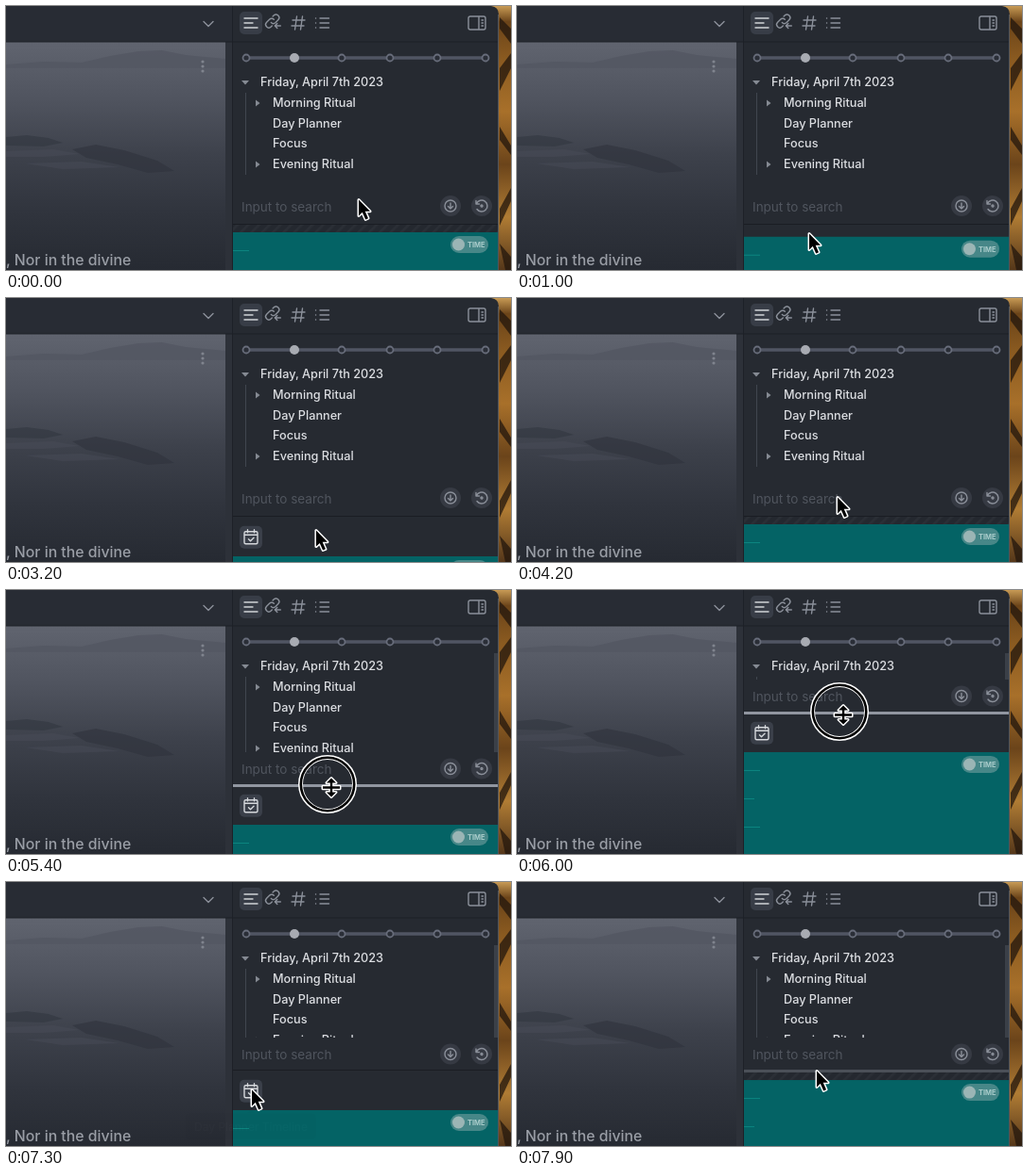
Animation, 534 px wide and 280 px high, one loop 8 s. Source, as an HTML page:

```html
<!DOCTYPE html>
<html lang="en">
<head>
<meta charset="utf-8">
<title>Collapsing sidebar header</title>
<style>
  html, body { margin: 0; width: 100%; height: 100%; overflow: hidden; background: #262a31; }
  svg { display: block; width: 534px; height: 280px; font-family: Inter, sans-serif; }
  .icon { fill: none; stroke: #8b909a; stroke-width: 1.4; stroke-linecap: round; stroke-linejoin: round; }
  .tree { font-size: 12.7px; font-weight: 500; fill: #dcdee2; }
  .cursor { stroke: #fff; stroke-width: 3; stroke-linejoin: round; paint-order: stroke; }
</style>
</head>
<body>
<svg viewBox="0 0 534 280">
  <defs>
    <linearGradient id="sea" x2="0" y2="1">
      <stop offset="0" stop-color="#60646f"/>
      <stop offset=".25" stop-color="#50545f"/>
      <stop offset=".5" stop-color="#3d414b"/>
      <stop offset=".75" stop-color="#30343d"/>
      <stop offset="1" stop-color="#262a32"/>
    </linearGradient>
    <linearGradient id="wall" x2="0" y2="1">
      <stop offset="0" stop-color="#c79a55"/>
      <stop offset=".06" stop-color="#6b4419"/>
      <stop offset=".2" stop-color="#8a5a20"/>
      <stop offset=".4" stop-color="#a8702a"/>
      <stop offset=".6" stop-color="#6b441a"/>
      <stop offset=".8" stop-color="#b07c34"/>
      <stop offset="1" stop-color="#55371a"/>
    </linearGradient>
    <pattern id="hatch" width="8" height="8" patternUnits="userSpaceOnUse" patternTransform="rotate(45)">
      <rect width="8" height="8" fill="#24282f"/><rect width="2.5" height="8" fill="#2b2f36"/>
    </pattern>
    <clipPath id="treeClip"><rect id="treeBox" x="240" y="66" width="281"/></clipPath>
    <clipPath id="headClip"><rect id="headBox" x="240" width="281"/></clipPath>
  </defs>

  <!-- desktop and window -->
  <rect x="510" width="24" height="280" fill="url(#wall)"/>
  <path d="M522 12l12 12v16l-12-16zM522 66l12-16v16l-12 24zM522 128l12 20v10l-12-16zM522 215l12-22v14l-12 26zM522 252l12 14v14h-6z" fill="#22160d" opacity=".75"/>
  <path d="M0 0H513Q521 1 521 9V280H0Z" fill="#262a31"/>
  <rect width="239" height="38" fill="#282c34"/>

  <!-- note -->
  <rect y="38" width="232" height="242" fill="url(#sea)"/>
  <path d="M0 62L40 59 80 60 110 53 140 48 165 47 190 52 232 56V66H0Z" fill="#535762" opacity=".8"/>
  <path d="M0 139L22 137 45 140 60 145 40 149 0 148Z" fill="#31353e" opacity=".55"/>
  <path d="M70 152L95 147 125 153 160 164 178 175 150 177 118 168 85 161Z" fill="#2f333c" opacity=".6"/>
  <path d="M0 154L50 152 78 157 40 160 0 160ZM20 167L80 165 120 171 60 173Z" fill="#4b4f5a" opacity=".4"/>
  <rect x="232" y="38" width="7" height="242" fill="#2d3139"/>
  <g fill="#80848e"><circle cx="208" cy="59" r="1.600"/><circle cx="208" cy="64" r="1.600"/><circle cx="208" cy="69" r="1.600"/></g>
  <text x="0" y="275" font-size="15.800" font-weight="500" fill="#9a9ea6">, Nor in the divine</text>
  <path class="icon" d="M209 16.500l5 5 5-5"/>
  <path d="M0 38H521M239.500 0V280" stroke="#1d2027"/>

  <!-- toolbar -->
  <rect x="247" y="6" width="24" height="24" rx="5" fill="#383d47"/>
  <path class="icon" style="stroke:#d0d3d8" d="M252 13h14M252 18h9M252 23h14"/>
  <g class="icon">
    <path transform="translate(-.7 0)" d="M282 21l-1 1a3.300 3.300 0 0 1-4.700-4.700l3-3a3.300 3.300 0 0 1 4.700 0M281 17.500a3.300 3.300 0 0 0 4.500.3l3-3a3.300 3.300 0 0 0-4.700-4.700l-1 1M291 21h-6m2.500-2.500L285 21l2.500 2.500"/>
    <path d="M303 15h13M302 21h13M307.500 11l-2 14M313.500 11l-2 14"/>
    <path d="M327.500 13h.1M327.500 18h.1M327.500 23h.1M332 13h9.500M332 18h9.500M332 23h9.500"/>
    <path d="M491 11h14q2 0 2 2v10q0 2-2 2h-14q-2 0-2-2v-10q0-2 2-2zM500 11v14M503 15h1.500M503 18h1.500M503 21h1.500"/>
  </g>
  <path d="M254 55H507" stroke="#505563" stroke-width="3.500"/>
  <g id="stops" fill="#2a2e37" stroke="#686d7b" stroke-width="1.800"></g>
  <circle cx="305" cy="55" r="5" fill="#a8abb2"/>

  <!-- outline -->
  <g clip-path="url(#treeClip)">
    <path d="M253.500 92V179" stroke="#41464f"/>
    <path d="M249 79h8l-4 4.500zM264 99.500v7l4.500-3.500zM264 164.500v7l4.500-3.500z" fill="#858a93"/>
    <g class="tree">
      <text x="269" y="85">Friday, April 7th 2023</text>
      <text x="282" y="107">Morning Ritual</text>
      <text x="282" y="129">Day Planner</text>
      <text x="282" y="150">Focus</text>
      <text x="282" y="172">Evening Ritual</text>
    </g>
  </g>
  <rect id="scroll" x="516" y="67" width="4" fill="#3b4048"/>

  <g id="search">
    <text x="249" y="5.500" font-size="13.500" fill="#50555e">Input to search</text>
    <g fill="#363a43"><circle cx="470" r="11"/><circle cx="503" r="11"/></g>
    <g class="icon">
      <circle cx="470" r="6"/><path d="M470-3v6m-2.500-2.500L470 3l2.500-2.500"/>
      <path d="M497.500-2.500A6 6 0 1 1 498 3.500M497-5.500v3.500h3.500"/><circle cx="503" r="1"/>
    </g>
  </g>

  <!-- lower pane -->
  <g clip-path="url(#headClip)">
    <rect id="head" x="240" y="0" width="281" height="280"/>
    <g id="tab">
      <rect x="247" y="-12" width="24" height="24" rx="5" fill="#3a3f49"/>
      <path class="icon" style="stroke:#d5d8dc" d="M253.500-6h11q1.500 0 1.500 1.500v10q0 1.500-1.500 1.500h-11q-1.500 0-1.500-1.500v-10q0-1.500 1.500-1.500zM252-2.500h14M255.500-8v3M262.500-8v3M256.500 2l2 2 3.500-3.500"/>
    </g>
  </g>
  <path id="edge" d="M240 0H521"/>
  <g id="teal">
    <rect x="240" width="281" height="280" fill="#046365"/>
    <g id="ticks" stroke="#0c8580"></g>
    <rect x="470" y="4" width="40" height="18" rx="9" fill="#478788"/>
    <circle cx="478.500" cy="13" r="6.500" fill="#9bb5b5"/>
    <text x="488" y="15.800" font-size="7.500" font-weight="700" fill="#a9cccb">TIME</text>
  </g>
  <path d="M520.500 9V280" stroke="#50555d"/>

  <g id="tip">
    <path d="M259 19l5 5h-10z" fill="#14171b"/>
    <rect x="190" y="24" width="138" height="27" rx="4" fill="#14171b"/>
    <text x="259" y="42" font-size="12" text-anchor="middle" fill="#dcdee2">Day Planner Timeline</text>
  </g>

  <g id="ring" fill="none">
    <circle r="28.500" stroke="#fff" stroke-width="5"/><circle r="28.200" stroke="#000" stroke-width="2.600"/>
  </g>
  <path id="arrow" class="cursor" d="M1 1.500V18.500L4.800 14.800 8.200 22.400 11 21.200 7.700 13.700H13Z"/>
  <g id="beam" fill="none" stroke-linecap="round">
    <path d="M-4-10Q0-10 0-7Q0-10 4-10M0-7V8M-4 11Q0 11 0 8Q0 11 4 11M-2 4H2" stroke="#fff" stroke-width="3.600"/>
    <path d="M-4-10Q0-10 0-7Q0-10 4-10M0-7V8M-4 11Q0 11 0 8Q0 11 4 11M-2 4H2" stroke="#000" stroke-width="1.400"/>
  </g>
  <path id="resize" class="cursor" d="M0-10L5-5H1.200V-1.200H9V1.200H1.200V5H5L0 10-5 5H-1.200V1.200H-9V-1.200H-1.200V-5H-5Z"/>
</svg>
<script>
const el = id => document.getElementById(id);
const set = (id, name, value) => el(id).setAttribute(name, value);
const move = (id, x, y) => set(id, 'transform', `translate(${x} ${y})`);
const fade = (id, value) => set(id, 'opacity', value);
const clamp = v => Math.max(0, Math.min(1, v));
const smooth = v => { v = clamp(v); return v * v * (3 - 2 * v); };
const within = (t, a, b) => t >= a && t < b;

for (const x of [254, 355, 406, 456, 507])
  el('stops').innerHTML += `<circle cx="${x}" cy="55" r="3.500"/>`;
for (let i = 0; i < 8; i++)
  el('ticks').innerHTML += `<path d="M240 ${19.5 + 30 * i}h${i % 2 ? 11 : 17}"/>`;

const LOOP = 8000, REST = 232, CLOSED = 8, OPEN = 42, GRIP = 2.5;
const HOVERS = [[940, 2313], [2800, 3560], [5060, 7680]];
// time, x, y of the pointer
const PATH = [
  [0, 372, 204], [100, 372, 204], [300, 390, 182], [500, 372, 186], [900, 308, 240],
  [1000, 308, 240], [1200, 297, 243], [1500, 297, 243], [1700, 259, 244], [2050, 259, 245],
  [2400, 359, 219], [2700, 352, 221], [2900, 332, 240], [3300, 326, 246], [3450, 326, 246],
  [3900, 334, 169], [4000, 334, 169], [4200, 338, 210], [4500, 340, 234.5], [4800, 340, 234.5],
  [5200, 342, 217], [5400, 344, 209.5], [5850, 345, 131], [5950, 345, 131], [6600, 347, 216],
  [6700, 347, 216], [6900, 345, 202.5], [7000, 325, 207], [7250, 259, 219], [7550, 259, 219],
  [7900, 316, 199], [8000, 316, 199]
];

function pointerAt(t) {
  const i = PATH.findIndex(p => p[0] > t);
  const [t0, x0, y0] = PATH[i - 1], [t1, x1, y1] = PATH[i];
  const p = smooth((t - t0) / (t1 - t0));
  return [x0 + (x1 - x0) * p, y0 + (y1 - y0) * p];
}

function draw(t) {
  const [x, y] = pointerAt(t);
  const split = t < 4800 ? REST : t < 6900 ? y - GRIP : 200;
  const open = HOVERS.reduce((sum, [a, b]) => sum + smooth((t - a) / 260) - smooth((t - b) / 260), 0);
  const height = CLOSED + (OPEN - CLOSED) * open;
  const hovered = HOVERS.some(([a, b]) => within(t, a, b));
  const middle = split + height / 2 + 0.7;

  set('treeBox', 'height', Math.max(0, split - 101));
  set('scroll', 'height', Math.max(0, split - 102));
  fade('scroll', split < 230 ? 1 : 0);
  move('search', 0, split - 20 + Math.min(2.5, Math.max(0, (REST - split) / 8)));

  set('headBox', 'y', split);
  set('headBox', 'height', height);
  set('head', 'fill', hovered ? '#262a31' : 'url(#hatch)');
  move('tab', 0, middle);
  fade('tab', clamp((height - 13) / 12));
  move('teal', 0, split + height);

  const held = within(t, 4450, 6950), near = t >= 7850;
  move('edge', 0, split + (held || near ? 0.5 : -0.5));
  set('edge', 'stroke', held ? '#9196a0' : near ? '#4b5058' : '#1a1d23');
  set('edge', 'stroke-width', held || near ? 3 : 1);

  move('tip', 0, middle);
  fade('tip', Math.max(clamp((t - 1900) / 100) * clamp((2200 - t) / 100),
                      clamp((t - 7300) / 100) * clamp((7680 - t) / 100)));

  const beam = within(t, 2330, 2620);
  const shown = { arrow: !beam && !held, beam, resize: held };
  for (const id in shown) { move(id, x, y); fade(id, shown[id] ? 1 : 0); }
  move('ring', x - 4, y - 3.5);
  fade('ring', within(t, 4780, 6930) ? 1 : 0);
}

function tick() {
  draw(performance.now() % LOOP);
  requestAnimationFrame(tick);
}
tick();
</script>
</body>
</html>
```
